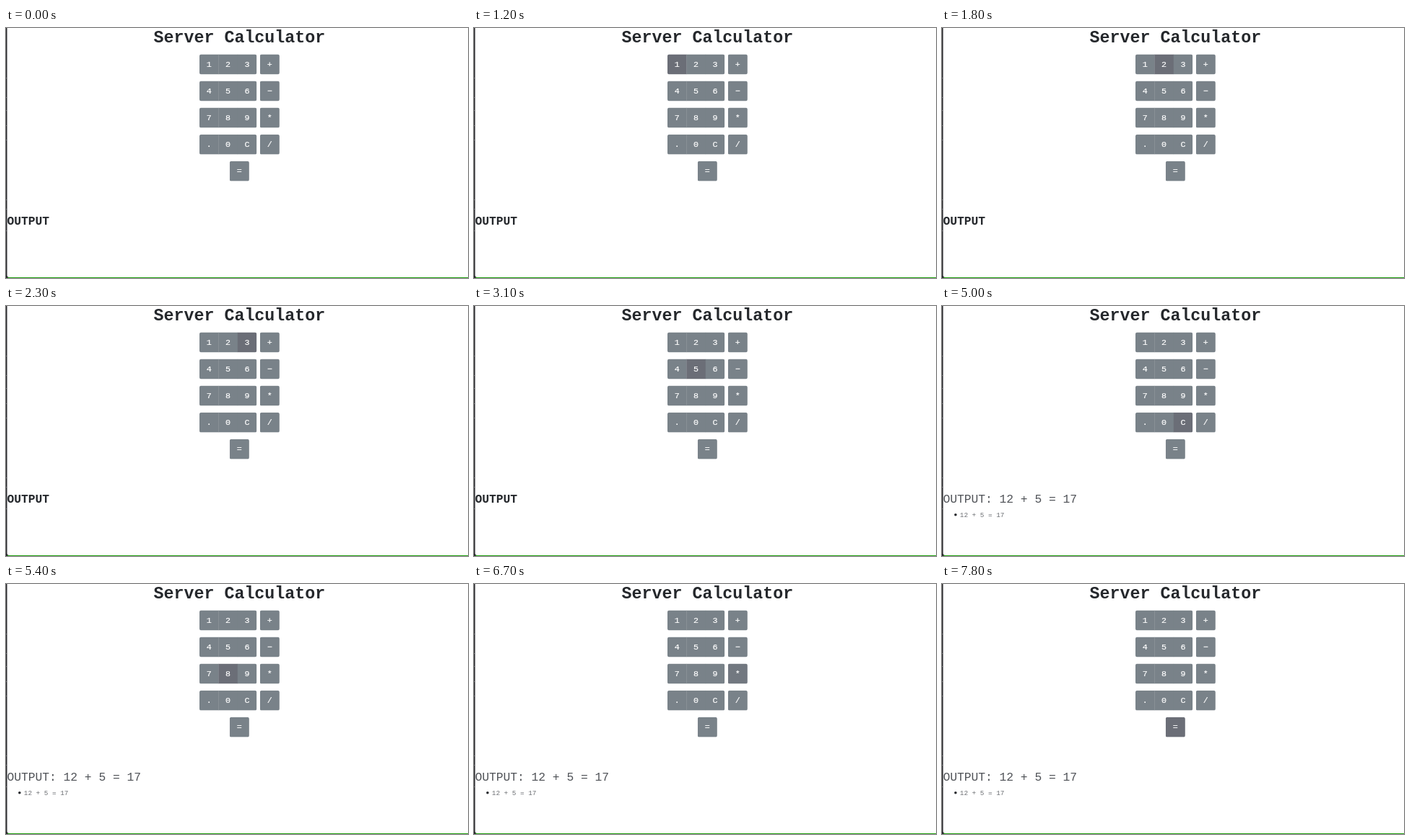
An HTML page for the animation above (8 s loop, 640 by 347 pixels).

```html
<!DOCTYPE html>
<html lang="en">
<head>
<meta charset="utf-8">
<title>Server Calculator</title>
<style>
  html, body { margin: 0; width: 100%; height: 100%; overflow: hidden; background: #fff; }
  svg { display: block; width: 100vw; height: 100vh; }
  text { font-family: "Liberation Mono", "Courier New", monospace; fill: #505358; white-space: pre; }
  .bold { font-weight: bold; fill: #25282c; }
  .small { fill: #6d7074; }
  .key { font-size: 11.66px; fill: #fff; stroke: #fff; stroke-width: 0.2; text-anchor: middle; }
</style>
</head>
<body>
<svg id="stage" viewBox="0 0 640 347" preserveAspectRatio="none">
  <defs><clipPath id="pads"></clipPath></defs>
  <rect width="640" height="347" fill="#27272a"/>
  <g id="marks" fill="#6c6c70"></g>
  <path d="M1.5 0H640V346H4.5Q1.5 346 1.5 343Z" fill="#fff"/>
  <rect x="2" y="346" width="638" height="1" fill="#22a012"/>
  <text class="bold" x="323.4" y="20.2" font-size="23.3" text-anchor="middle">Server Calculator</text>
  <g id="keys" clip-path="url(#pads)"></g>
  <text id="idle" class="bold" x="1.4" y="273.2" font-size="16.3">OUTPUT</text>
  <g id="result">
    <text x="1.4" y="273.2" font-size="16.3">OUTPUT: 12 + 5 = 17</text>
    <circle cx="18.8" cy="289.7" r="1.8" fill="#25282c"/>
    <text class="small" x="24.8" y="292.6" font-size="9.33">12 + 5 = 17</text>
  </g>
</svg>
<script>
const LOOP = 8000, RESULT_AT = 4200;
const BASE = [121, 130, 137], HOVER = [107, 110, 119];
const LEFT = 268, SIDE = 351.8, MIDDLE = 309.8;
const TOP = 36.5, CELL = 26.4, ROW = 37.05, HIGH = 27.9, WIDE = 27;
const byId = id => document.getElementById(id);

// key, fade-in start and end, fade-out start and end
const hovers = [
  ["1", 1200, 1200, 1800, 1800],
  ["2", 1800, 1800, 2300, 2300],
  ["3", 2300, 2300, 2500, 2600],
  ["+", 2500, 2600, 3000, 3100],
  ["5", 3000, 3100, 3600, 3700],
  ["=", 3700, 3800, 4500, 4600],
  ["C", 4500, 4600, 5300, 5400],
  ["8", 5300, 5400, 5900, 6000],
  ["*", 6000, 6100, 6700, 6800],
  ["8", 7000, 7100, 7500, 7600],
  ["=", 7800, 7800, LOOP, LOOP]
];

function add(parent, tag, attrs) {
  const el = document.createElementNS("http://www.w3.org/2000/svg", tag);
  for (const name in attrs) el.setAttribute(name, attrs[name]);
  return parent.appendChild(el);
}

function addPad(x, y, width) {
  add(byId("pads"), "rect", { x, y, width, height: HIGH, rx: 2.6 });
}

const faces = {};
function addKey(label, x, y, width) {
  faces[label] = add(byId("keys"), "rect", { x, y, width: width + 0.3, height: HIGH });
  add(byId("keys"), "text", { class: "key", x: x + width / 2, y: y + 17.1 }).textContent = label;
}

for (const y of [69, 96, 114, 135, 155, 238, 251, 281])
  add(byId("marks"), "rect", { y, width: 1, height: 1 });

["123+", "456−", "789*", ".0C/"].forEach((row, r) => {
  const y = TOP + r * ROW;
  addPad(LEFT, y, CELL * 3);
  addPad(SIDE, y, WIDE);
  [...row].forEach((label, c) =>
    c < 3 ? addKey(label, LEFT + c * CELL, y, CELL) : addKey(label, SIDE, y, WIDE));
});
addPad(MIDDLE, TOP + 4 * ROW, WIDE);
addKey("=", MIDDLE, TOP + 4 * ROW, WIDE);
// keep labels above neighbouring faces
document.querySelectorAll(".key").forEach(el => byId("keys").append(el));

const step = (t, a, b) => t < a ? 0 : t < b ? 0.5 : 1;

function draw(t) {
  const level = {};
  for (const [key, a, b, c, d] of hovers)
    level[key] = (level[key] || 0) + step(t, a, b) - step(t, c, d);
  for (const key in faces) {
    const k = level[key] || 0;
    const rgb = BASE.map((v, i) => Math.round(v + (HOVER[i] - v) * k));
    faces[key].setAttribute("fill", `rgb(${rgb})`);
  }
  const done = t >= RESULT_AT;
  byId("idle").setAttribute("visibility", done ? "hidden" : "visible");
  byId("result").setAttribute("visibility", done ? "visible" : "hidden");
}

const start = performance.now();
function frame() {
  draw((performance.now() - start) % LOOP);
  requestAnimationFrame(frame);
}
frame();
</script>
</body>
</html>
```
